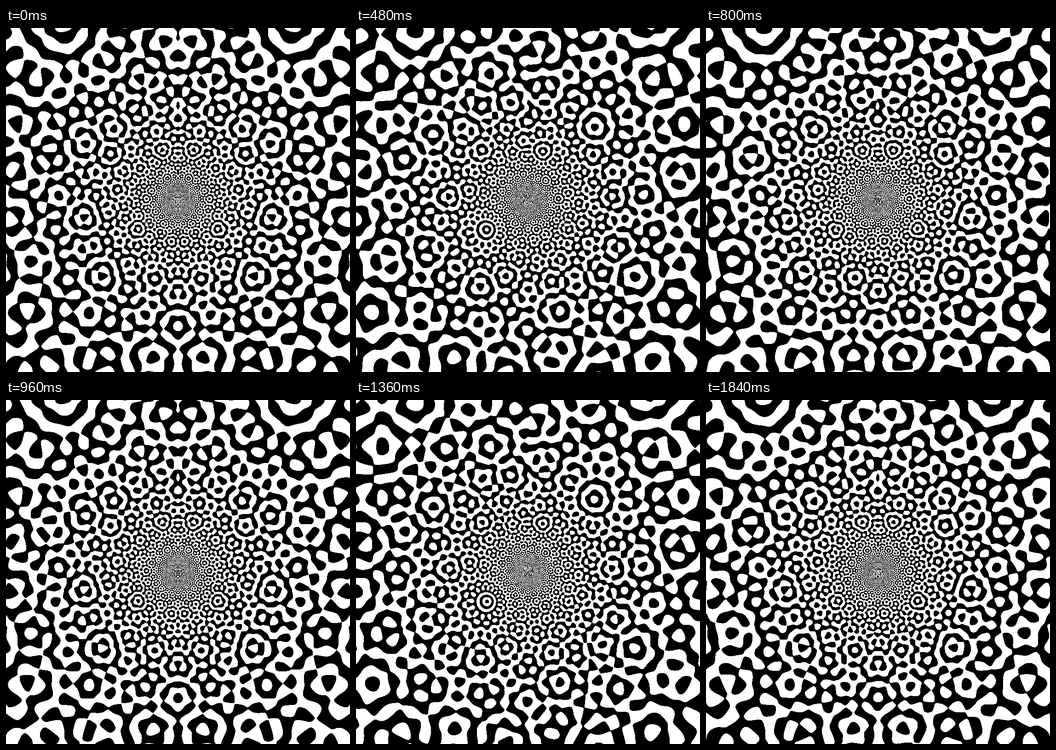
Write an HTML page with a canvas that moves like this. It is 748 by 748 pixels and loops after 1920 ms.

```html
<!DOCTYPE html>
<html lang="en">
<head>
<meta charset="utf-8">
<title>Log-polar quasicrystal</title>
<style>
  html, body { margin: 0; width: 100%; height: 100%; overflow: hidden; background: #fff; }
  canvas { display: block; width: 100vw; height: 100vh; image-rendering: pixelated; }
</style>
</head>
<body>
<canvas id="stage" width="748" height="748"></canvas>
<script>
const start = performance.now();
const SIZE = 748, CENTER = SIZE / 2;
const WAVES = 8;           // plane waves spread over half a turn
const WAVE_NUMBER = 61;    // per radian and per unit of log radius
const UNIT = 0.938;        // radius where the log is zero
const STEPS = 24, STEP_MS = 80;
const BLACK = 0xff000000, WHITE = 0xffffffff;

const ctx = document.getElementById('stage').getContext('2d');
const image = ctx.createImageData(SIZE, SIZE);
const pixels = new Uint32Array(image.data.buffer);

// Every wave shares one time phase, so the sum is kept as a complex amplitude.
const real = new Float32Array(SIZE * SIZE);
const imag = new Float32Array(SIZE * SIZE);
const directions = Array.from({ length: WAVES }, (_, i) => {
  const angle = i * Math.PI / WAVES;
  return [Math.cos(angle) * WAVE_NUMBER, Math.sin(angle) * WAVE_NUMBER];
});

function prepare() {
  for (let y = 0, p = 0; y < SIZE; y++) {
    for (let x = 0; x < SIZE; x++, p++) {
      const dx = x + 0.5 - CENTER, dy = y + 0.5 - CENTER;
      const theta = Math.atan2(-dx, dy);
      const depth = Math.log(Math.hypot(dx, dy) / UNIT);
      for (const [kx, ky] of directions) {
        const phase = kx * theta + ky * depth;
        real[p] += Math.cos(phase);
        imag[p] += Math.sin(phase);
      }
    }
  }
}

function draw(step) {
  const phase = step / STEPS * 2 * Math.PI;
  const c = Math.cos(phase), s = Math.sin(phase);
  for (let p = 0; p < pixels.length; p++) {
    pixels[p] = real[p] * c + imag[p] * s > 0 ? WHITE : BLACK;
  }
  ctx.putImageData(image, 0, 0);
}

let shown = -1;
function tick() {
  const step = Math.floor((performance.now() - start) / STEP_MS) % STEPS;
  if (step !== shown) draw(shown = step);
  requestAnimationFrame(tick);
}

prepare();
draw(shown = 0);
requestAnimationFrame(tick);
</script>
</body>
</html>
```
